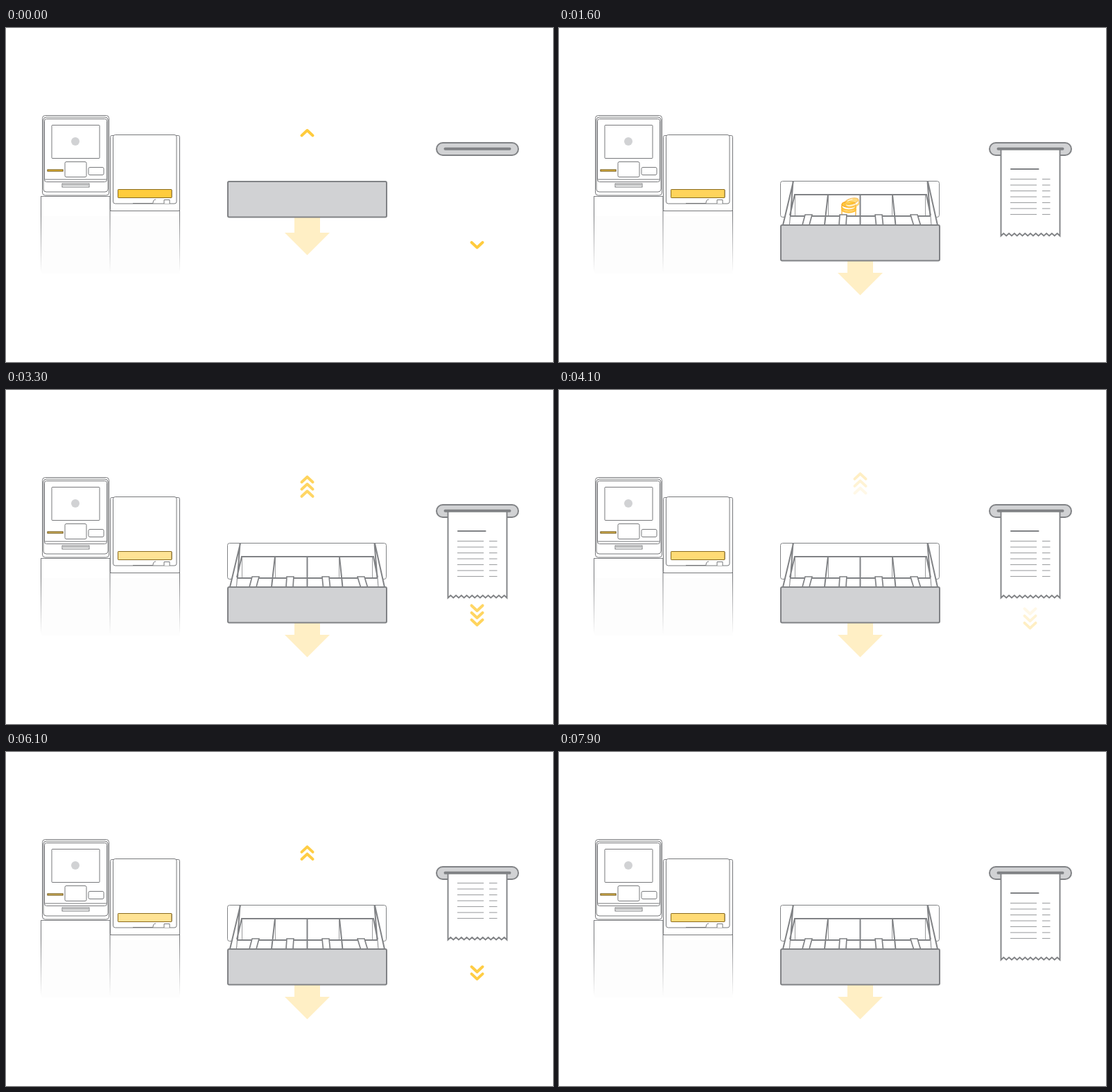
An HTML page for the animation above (8 s loop, 789 by 483 pixels).

```html
<!DOCTYPE html>
<html lang="en">
<head>
<meta charset="utf-8">
<title>Kiosk, cash drawer and receipt</title>
<style>
  html, body { margin: 0; width: 100%; height: 100%; overflow: hidden; background: #fff; }
  svg { display: block; width: 789px; height: 483px; }
  .line { fill: none; stroke: #808285; }
  .box { fill: #fff; stroke: #77787b; }
  .solid { fill: #d1d2d4; stroke: #808285; stroke-width: 2; }
  .light { fill: #ffcc3c; stroke: #8a6a1c; }
  .chevron { fill: none; stroke: #ffcb3d; stroke-width: 4; stroke-linecap: round; stroke-linejoin: round; }
  .coin { stroke: #f7a823; stroke-width: 1.2; }
</style>
</head>
<body>
<svg viewBox="0 0 789 483">
  <defs>
    <linearGradient id="fade" gradientUnits="userSpaceOnUse" x1="0" y1="243" x2="0" y2="353">
      <stop offset=".25" stop-color="#77787b"/>
      <stop offset="1" stop-color="#77787b" stop-opacity="0"/>
    </linearGradient>
    <clipPath id="belowPanel"><path d="M300 221H570V400H300Z"/></clipPath>
    <clipPath id="belowSlot"><path d="M620 175H745V400H620Z"/></clipPath>
  </defs>

  <!-- Kiosk -->
  <path d="M51 272H250V355H51Z" fill="#fdfdfd"/>
  <path d="M50.5 243V353M150 243V353M250.5 264V353" fill="none" stroke="url(#fade)"/>
  <path class="line" d="M50.5 243.5H150M150 264.5H250.5V243"/>
  <g class="box">
    <rect x="52.5" y="126.500" width="96" height="115.500" rx="4"/>
    <rect x="54" y="129" width="93" height="108" rx="4"/>
    <rect x="55.500" y="131.500" width="90" height="91" rx="3"/>
    <path d="M56 219H145"/>
    <rect x="66" y="140.500" width="69" height="48" rx="1"/>
    <rect x="85" y="193.500" width="31" height="22" rx="2"/>
    <rect x="119" y="201.500" width="22" height="11" rx="2"/>
    <rect x="81" y="225" width="39" height="5"/>
    <path d="M82 227H119"/>
    <rect x="60" y="205" width="22" height="2"/>
    <rect x="150.500" y="155.500" width="100" height="109" rx="2"/>
    <rect x="154.500" y="154.500" width="91.500" height="99.500" rx="3"/>
    <rect x="161.500" y="233.500" width="77.500" height="12" rx="1"/>
    <path d="M183 253.500H212Q212 248 216 248M228 254V248.500H236V254"/>
  </g>
  <circle cx="100" cy="164" r="6" fill="#d1d2d4"/>
  <rect class="light" x="60" y="205" width="22" height="2"/>
  <rect class="light" x="161.500" y="233.500" width="77.500" height="12" rx="1"/>

  <!-- Cash drawer -->
  <path id="arrow" d="M416 262H453V296H467L434.500 328.500 402 296H416Z" fill="#ffefc5"/>
  <rect class="line" x="319.500" y="221.500" width="229" height="52" rx="3" fill="#fff"/>
  <g clip-path="url(#belowPanel)">
    <g id="tray">
      <path d="M338 222H532L546 285H323Z" fill="#fff"/>
      <path class="line" stroke-width="2" d="M338 222 323 285M337.500 222 333 285M532 222 546 285M531.500 222 536.500 285M339 241H530L536 271M388 241 383 285M434.500 241V285M481 241 485.500 285M340 241 333 271"/>
      <path class="line" stroke-width=".8" d="M340.500 241V271M388.500 241V271M480.500 241V271M528.500 241V271"/>
      <g id="coins"></g>
      <path d="M334 272H535.500L536.500 285H333Z" fill="#fff"/>
      <path class="line" stroke-width="2" d="M333 272H536M384.500 272 383 285M434.500 272V285M484.200 272 485.500 285"/>
      <path fill="#fff" stroke="#808285" stroke-width="1.700" d="M355 270H365L361 285H351ZM405 270H415L414 285H404ZM456 270H466L467.500 285H457.500ZM507 270H517L521.500 285H511.500Z"/>
    </g>
  </g>
  <path class="line" d="M337 221.500H532"/>
  <rect class="solid" id="front" x="320" y="222" width="229" height="51.500" rx="2"/>

  <!-- Receipt printer -->
  <rect class="solid" x="621" y="166" width="118" height="18" rx="9"/>
  <g clip-path="url(#belowSlot)"><g id="receipt"></g></g>
  <path class="line" d="M633.500 174.800H726.500" stroke-width="4" stroke-linecap="round"/>

  <g id="chevrons"></g>
</svg>

<script>
const LOOP = 8000, STEP = 100;
const $ = id => document.getElementById(id);
const clamp = (v, lo = 0, hi = 1) => Math.min(hi, Math.max(lo, v));
const move = (el, y) => el.setAttribute('transform', `translate(0 ${y})`);

function add(parent, markup) {
  parent.insertAdjacentHTML('beforeend', markup);
  return parent.lastElementChild;
}

// Receipt: torn edge, heading and seven rows
const teeth = Array.from({ length: 23 }, (_, i) => `${637.5 + i * 85 / 22} ${i % 2 ? 297 : 300.5}`);
const rows = Array.from({ length: 7 }, (_, i) => `M651 ${218.6 + i * 8.5}h38m8 0h11.500`).join('');
add($('receipt'), `<path d="M637.500 100L${teeth.join(' ')}V100" fill="#fff" stroke="#808285" stroke-width="1.900"/>`);
add($('receipt'), '<path class="line" d="M652 204H691.500" stroke-width="2.200" stroke-linecap="round"/>');
add($('receipt'), `<path d="${rows}" fill="none" stroke="#96989a"/>`);

// Coins, back to front, each lifting off at its own time
const coinShape = (x, y, depth) => `<g class="coin">
  <path d="M${x - 10} ${y}v${depth}a10 4.500 0 0 0 20 0v${-depth}" fill="#fff"/>
  <path d="M${x - 10} ${y + 4}a10 4.500 0 0 0 20 0" fill="none" stroke="#ffc23a" stroke-width="2.500"/>
  <ellipse cx="${x}" cy="${y}" rx="10" ry="4" fill="#ffcb3d"/>
  <path d="M${x - 6} ${y - 1}q4 -2 8 -1.500" fill="none" stroke="#fff" stroke-width="1"/></g>`;
const coins = [
  { x: 398, y: 263, depth: 6, start: 1100 },
  { x: 418, y: 258, depth: 12, start: 2500 },
  { x: 418, y: 255, depth: 4, start: 1950 },
  { x: 422, y: 269, depth: 4, start: 1350 }
].map(c => ({ ...c, el: add($('coins'), coinShape(c.x, c.y, c.depth)) }));

// Chevrons: trailing one first
const chevrons = [];
for (const [x, y, dir] of [[434.5, 148, -1], [679.5, 317.5, 1]]) {
  for (let i = 0; i < 3; i++) {
    const tip = y + dir * i * 10.3;
    const el = add($('chevrons'), `<path class="chevron" d="M${x - 8} ${tip - dir * 7.5}L${x} ${tip}L${x + 8} ${tip - dir * 7.5}"/>`);
    chevrons.push({ el, dir, i });
  }
}

function draw(t) {
  const glow = (1 + Math.cos(2 * Math.PI * (t + 50) / 1900)) / 2;
  document.querySelectorAll('.light').forEach(el => {
    el.setAttribute('fill-opacity', glow);
    el.setAttribute('stroke-opacity', clamp(glow * 2.5));
  });

  const k = clamp(t / 800);
  const open = k * k * (3 - 2 * k);
  move($('front'), 63 * open);
  move($('tray'), 63 * (open - 1));
  move($('arrow'), 58 * open);

  for (const c of coins) {
    const f = clamp((t - c.start) / 500);
    c.el.setAttribute('transform', `translate(0 ${-37 * f}) rotate(${-28 * f} ${c.x} ${c.y})`);
    c.el.setAttribute('opacity', f < 1 ? 1 - .65 * f : 0);
  }

  const length = clamp(.095 * (t % 5000 - 100), 0, 124);
  $('receipt').setAttribute('visibility', length ? 'visible' : 'hidden');
  move($('receipt'), length - 124);

  const p = (t + 200) % 3000;
  for (const { el, dir, i } of chevrons) {
    const alpha = p < 100 + 150 * i ? 0 : clamp(1 - (p - 250) / (1200 + 150 * i));
    el.setAttribute('opacity', alpha);
    move(el, dir * clamp((p - 200) / 175, 0, 7));
  }
}

function tick() {
  draw(Math.floor(performance.now() % LOOP / STEP) * STEP);
  requestAnimationFrame(tick);
}
tick();
</script>
</body>
</html>
```
